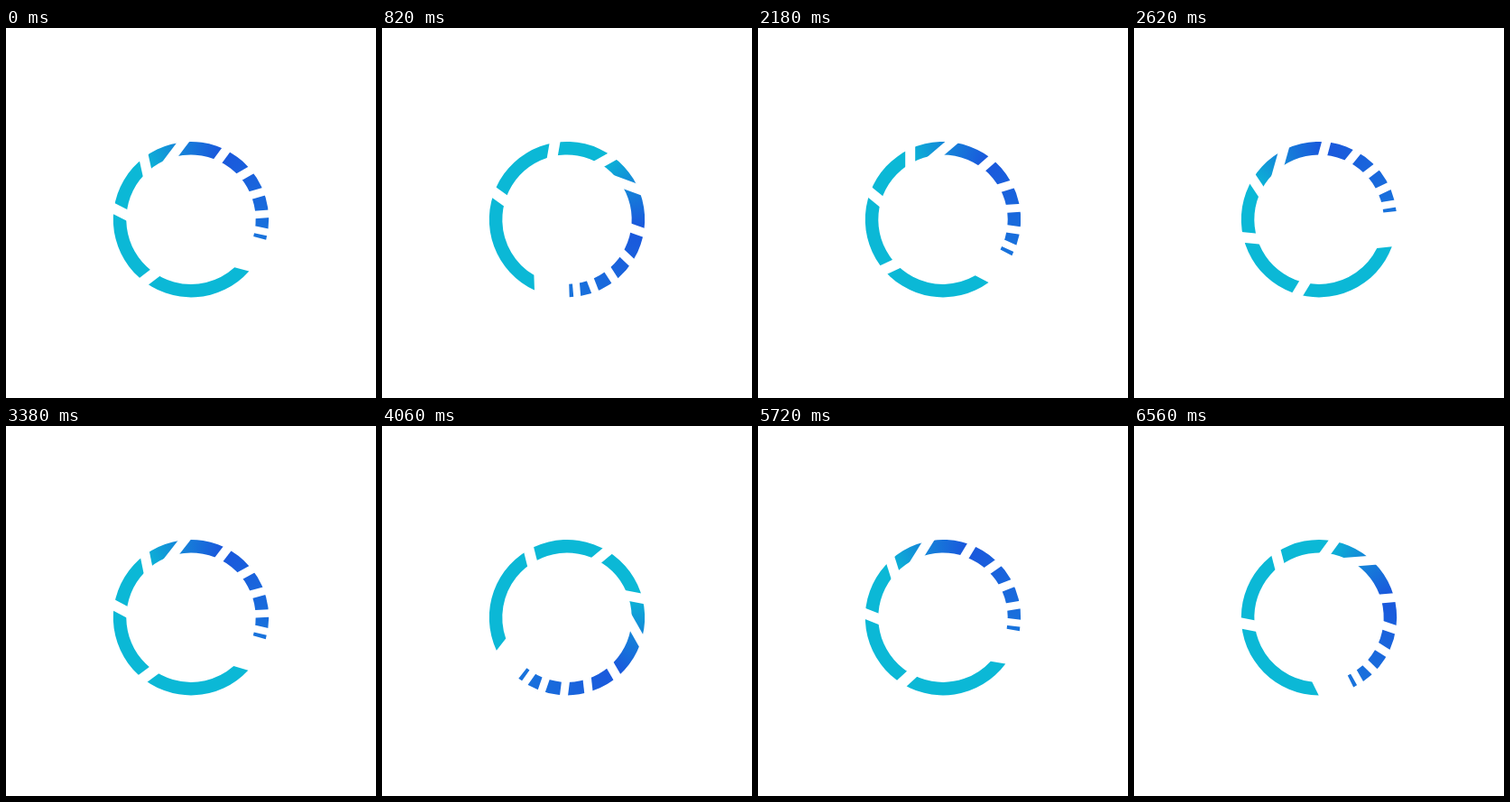
These frames come from a looping animation (410x410 px, 6.58 s). An HTML page with a canvas:

```html
<!DOCTYPE html>
<html>
<head>
<meta charset="utf-8">
<style>
  html, body { margin: 0; width: 100%; height: 100%; overflow: hidden; background: #fff; }
  canvas { display: block; }
</style>
</head>
<body>
<canvas id="stage" width="410" height="410"></canvas>
<script>
const ctx = document.getElementById('stage').getContext('2d');
const LOOP = 6580, STEP = 20, TURN = 1130;
const CX = 205, CY = 212.2, OUTER = 86.2, INNER = 71.7;
const rad = deg => deg * Math.PI / 180;

// Straight cuts through the ring: degrees at the outer edge, lag at the inner edge
const cuts = [[127.3, 3.2], [188, 4], [232.7, 5.5], [264.2, 12], [296.7, 2],
              [320.6, 2], [339, 1], [355.8, 0], [369.5, 0.5]];
const HEAD = 41.7, HEAD_SLANT = 6, TAIL = 375.2;

const fill = ctx.createConicGradient(rad(HEAD), 0, 0);
fill.addColorStop(0.52, '#0bb8d6');
fill.addColorStop(0.6, '#1488d8');
fill.addColorStop(0.7, '#1a57dc');
fill.addColorStop(1, '#187cdc');

// One counter-clockwise turn: a rest, a rush, a long glide [ms, degrees]
const keys = [[0, 360], [360, 338.7], [550, 180.5], [670, 113.3], [820, 73], [TURN, 0]];
const last = keys.length - 1;
const speed = i => (keys[i + 1][1] - keys[i][1]) / (keys[i + 1][0] - keys[i][0]);
const tangent = i => {
  const a = speed((i + last - 1) % last), b = speed(i % last);
  return 2 * a * b / (a + b);
};

// Monotone cubic through the keys
function angleAt(ms) {
  const t = ms % TURN;
  let i = 0;
  while (t >= keys[i + 1][0]) i++;
  const [t0, a0] = keys[i], [t1, a1] = keys[i + 1];
  const d = t1 - t0, u = (t - t0) / d, v = 1 - u;
  return a0 * v * v * (1 + 2 * u) + a1 * u * u * (3 - 2 * u)
    + d * u * v * (tangent(i) * v - tangent(i + 1) * u);
}

function drawRing() {
  ctx.fillStyle = fill;
  ctx.beginPath();
  ctx.arc(0, 0, OUTER, rad(HEAD), rad(TAIL));
  ctx.arc(0, 0, INNER, rad(TAIL), rad(HEAD + HEAD_SLANT), true);
  ctx.fill();
}

function drawCut([deg, lag], i) {
  const a = rad(deg), b = rad(deg - lag);
  const x = INNER * Math.cos(b), y = INNER * Math.sin(b);
  const dx = OUTER * Math.cos(a) - x, dy = OUTER * Math.sin(a) - y;
  ctx.lineWidth = 12 - i / 2;
  ctx.beginPath();
  ctx.moveTo(x - dx, y - dy);
  ctx.lineTo(x + 2 * dx, y + 2 * dy);
  ctx.stroke();
}

function draw(now) {
  const ms = Math.floor(now % LOOP / STEP) * STEP;
  ctx.fillStyle = ctx.strokeStyle = '#fff';
  ctx.fillRect(0, 0, 410, 410);
  ctx.save();
  ctx.translate(CX, CY);
  ctx.rotate(rad(angleAt(ms)));
  drawRing();
  cuts.forEach(drawCut);
  ctx.restore();
}

const start = performance.now();
function tick() {
  draw(performance.now() - start);
  requestAnimationFrame(tick);
}
tick();
</script>
</body>
</html>
```
